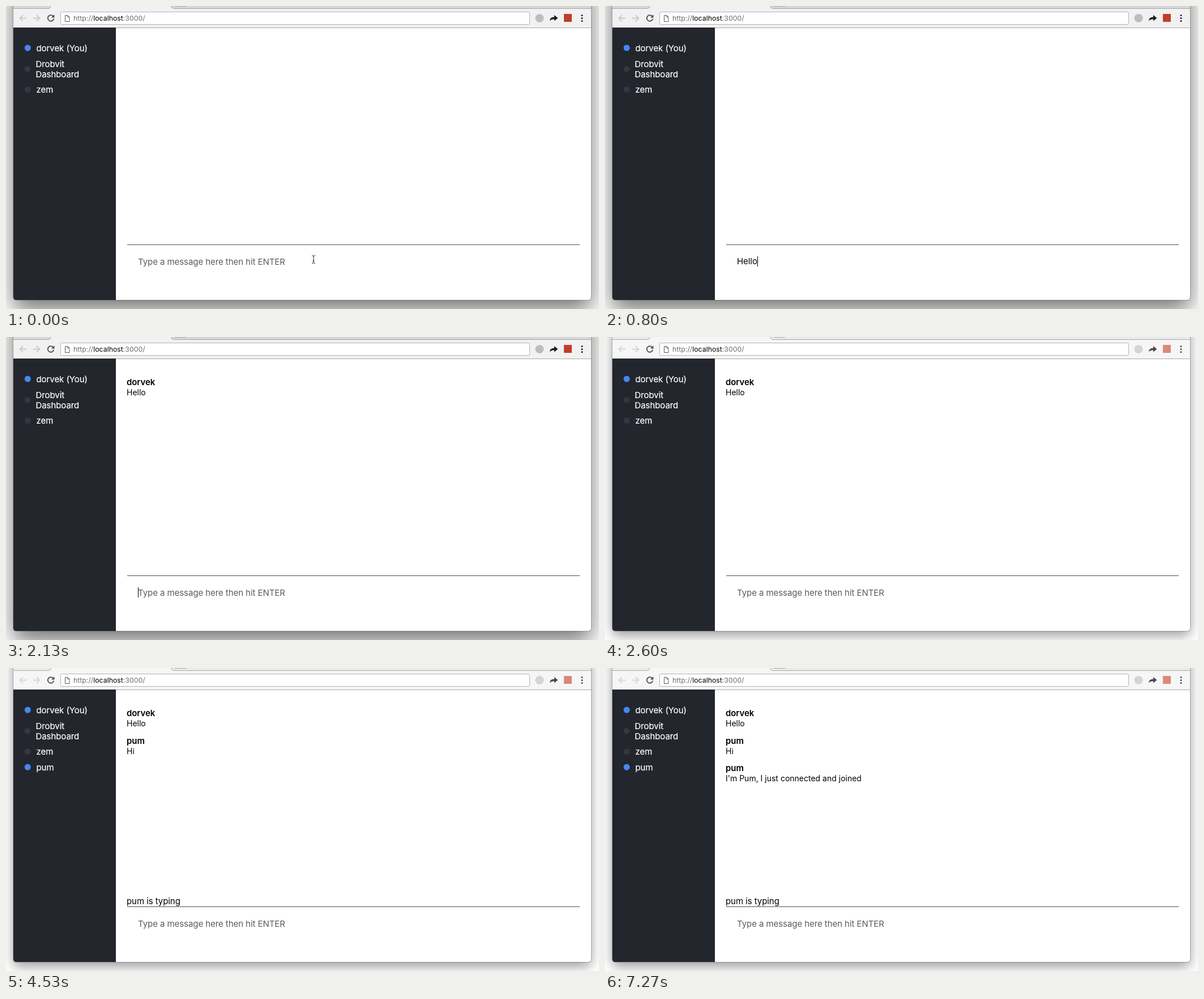
Recreate the animation shown at these times as an HTML page. Size 1047 by 535 pixels, loop 8000 ms.

```html
<!DOCTYPE html>
<html lang="en">
<head>
<meta charset="utf-8">
<title>Chat room</title>
<style>
  html, body { margin: 0; width: 100%; height: 100%; overflow: hidden; background: #fff; }

  body {
    --bar: #f6f6f6; --strip: #eaeaea; --ink: #4a4a4a; --dim: #d6d6d6; --badge: #d4d4d4; --addon: #d98a78;
    --shadow: 0 8px 22px rgba(0, 0, 0, .4);
    position: relative;
    font: 15px/18px Inter, "Open Sans", sans-serif;
    letter-spacing: -.07px;
    animation: focus 8s step-end infinite;
  }
  @keyframes focus {
    0% {
      --bar: #f1f1f1; --strip: #d7d7d7; --ink: #1c1c1c; --dim: #cacaca; --badge: #bdbdbd; --addon: #c0402c;
      --shadow: 0 18px 40px rgba(0, 0, 0, .55);
    }
    32.5% {
      --bar: #f6f6f6; --strip: #eaeaea; --ink: #4a4a4a; --dim: #d6d6d6; --badge: #d4d4d4; --addon: #d98a78;
      --shadow: 0 8px 22px rgba(0, 0, 0, .4);
    }
  }

  .window {
    position: absolute; left: 13px; top: -60px; width: 1020px; height: 579px;
    border-radius: 0 0 5px 5px; background: #fff;
    box-shadow: 0 0 0 1px rgba(0, 0, 0, .2), var(--shadow);
  }
  svg { position: absolute; left: 0; top: 0; }
  .strip { fill: var(--strip); }
  .bar { fill: var(--bar); }
  .edge { fill: none; stroke: #a9a9a9; }
  .nav { fill: none; stroke: var(--dim); stroke-width: 1.8; }
  .ink { fill: var(--ink); }
  .url { font-size: 12.3px; letter-spacing: 0; fill: #6e6e6e; }
  .people { fill: #fff; stroke: #fff; stroke-width: .2; }
  .people circle { fill: #343741; stroke: none; }
  .people .online { fill: #4488f4; }
  .name { font-weight: 600; }
  .body { font-size: 14px; letter-spacing: 0; }
  .hint { fill: #5b5b5b; }

  .typed {
    position: absolute; left: 233px; top: 442px; height: 18px;
    white-space: pre; border-right: 1px solid #000;
  }

  .step { opacity: 0; animation: 8s step-end infinite; }
  .hint { animation-name: hint; }
  .k1 { animation-name: k1; }
  .k2 { animation-name: k2; }
  .k3 { animation-name: k3; }
  .k4 { animation-name: k4; }
  .k5 { animation-name: k5; }
  .caret { animation-name: caret; }
  .pointer { animation-name: pointer; }
  .first { animation-name: first; }
  .joined { animation-name: joined; }
  .typing { animation-name: typing; }
  .second { animation-name: second; }
  .third { animation-name: third; }

  @keyframes hint { 0%, 14.125%, 100% { opacity: 1 } 2.5% { opacity: 0 } }
  @keyframes k1 { 2.5% { opacity: 1 } 5% { opacity: 0 } }
  @keyframes k2 { 5% { opacity: 1 } 6.625% { opacity: 0 } }
  @keyframes k3 { 6.625% { opacity: 1 } 8.375% { opacity: 0 } }
  @keyframes k4 { 8.375% { opacity: 1 } 10% { opacity: 0 } }
  @keyframes k5 { 10% { opacity: 1 } 14.125% { opacity: 0 } }
  @keyframes caret { 14.125%, 25.875% { opacity: 1 } 20%, 32.5% { opacity: 0 } }
  @keyframes pointer {
    0% { opacity: 1; transform: translate(543px, 447.5px) }
    2.5% { opacity: 0; transform: translate(555px, 447.5px) }
    25.875% { opacity: 1; transform: translate(555px, 447.5px) }
    26.625% { opacity: 0; transform: translate(555px, 447.5px) }
  }
  @keyframes first { 17.5%, 100% { opacity: 1 } }
  @keyframes joined { 34.125%, 100% { opacity: 1 } }
  @keyframes typing { 50%, 90.875%, 100% { opacity: 1 } 86.625% { opacity: 0 } }
  @keyframes second { 56.625%, 100% { opacity: 1 } }
  @keyframes third { 85%, 100% { opacity: 1 } }
</style>
</head>
<body>
<div class="window"></div>

<svg width="1047" height="535" viewBox="0 0 1047 535">
  <!-- Browser bar -->
  <path class="strip" d="M13 0H1033V5H13z"/>
  <path class="bar" d="M13 5H75Q78 4.500 80 0H291Q293 4.500 296 5H1033V38H13z"/>
  <path class="edge" d="M13 4.500H75Q78 4.500 80 -1M291 -1Q293 4.500 296 4.500H1033M13 38.500H1033"/>
  <rect class="edge" x="296.500" y="-6" width="23" height="6.500" rx="2"/>
  <path class="nav" d="M36 21.500H24.500M30 16L24.500 21.500L30 27M48 21.500H59.500M54 16L59.500 21.500L54 27"/>
  <path d="M83.300 18.200A5.300 5.300 0 1 0 84.300 22.500" fill="none" stroke="#505050" stroke-width="1.900"/>
  <path d="M85.500 15V20.500H80z" fill="#505050"/>
  <rect x="96.500" y="10.500" width="828" height="22" rx="2" fill="#fff" stroke="#b2b2b2"/>
  <path d="M104.500 16.500H109L112 19.500V27.500H104.500zM109 16.500V19.500H112" fill="none" stroke="#5a5a5a"/>
  <text class="url" x="119" y="25.500">http://<tspan fill="#000">localhost</tspan>:3000/</text>
  <circle cx="942" cy="21.500" r="7.500" fill="var(--badge)"/>
  <path class="ink" d="M960 26.500Q960 19.500 968 19.500V16L974.500 21.300L968 26.500V23.200Q963 23 960 26.500z"/>
  <rect x="985" y="14" width="14" height="14" fill="var(--addon)"/>
  <g class="ink">
    <circle cx="1017" cy="16.500" r="1.500"/>
    <circle cx="1017" cy="21.500" r="1.500"/>
    <circle cx="1017" cy="26.500" r="1.500"/>
  </g>

  <!-- Sidebar -->
  <path d="M13 38H194V519H18Q13 519 13 514z" fill="#23262d"/>
  <g class="people">
    <circle class="online" cx="38.300" cy="74" r="5.500"/>
    <text x="53.500" y="80">dorvek (You)</text>
    <circle cx="38" cy="111.300" r="5.300"/>
    <text x="52.500" y="107.500">Drobvit</text>
    <text x="52.500" y="126.300">Dashboard</text>
    <circle cx="38.300" cy="147.500" r="5.500"/>
    <text x="53.500" y="153">zem</text>
    <g class="step joined">
      <circle class="online" cx="38.300" cy="175" r="5.500"/>
      <text x="53.500" y="180.500">pum</text>
    </g>
  </g>

  <!-- Messages -->
  <g class="step first">
    <text class="name" x="213" y="85">dorvek</text>
    <text class="body" x="213" y="103">Hello</text>
  </g>
  <g class="step second">
    <text class="name" x="213" y="134">pum</text>
    <text class="body" x="213" y="152">Hi</text>
  </g>
  <g class="step third">
    <text class="name" x="213" y="182.300">pum</text>
    <text class="body" x="213" y="200.300">I'm Pum, I just connected and joined</text>
  </g>
  <text class="step typing" x="213" y="417">pum is typing</text>

  <!-- Input -->
  <path d="M214 421.500H1013" stroke="#4c4c4c"/>
  <text class="step hint" x="233" y="456.500">Type a message here then hit ENTER</text>
  <path class="step caret" d="M233.500 442V460" stroke="#000"/>
  <path class="step pointer" d="M-3 -7Q0 -7 0 -5Q0 -7 3 -7M0 -5V5M-3 7Q0 7 0 5Q0 7 3 7M-1.500 2.500H1.500" fill="none" stroke="#222"/>
</svg>

<span class="typed step k1">H</span>
<span class="typed step k2">He</span>
<span class="typed step k3">Hel</span>
<span class="typed step k4">Hell</span>
<span class="typed step k5">Hello</span>
</body>
</html>
```
